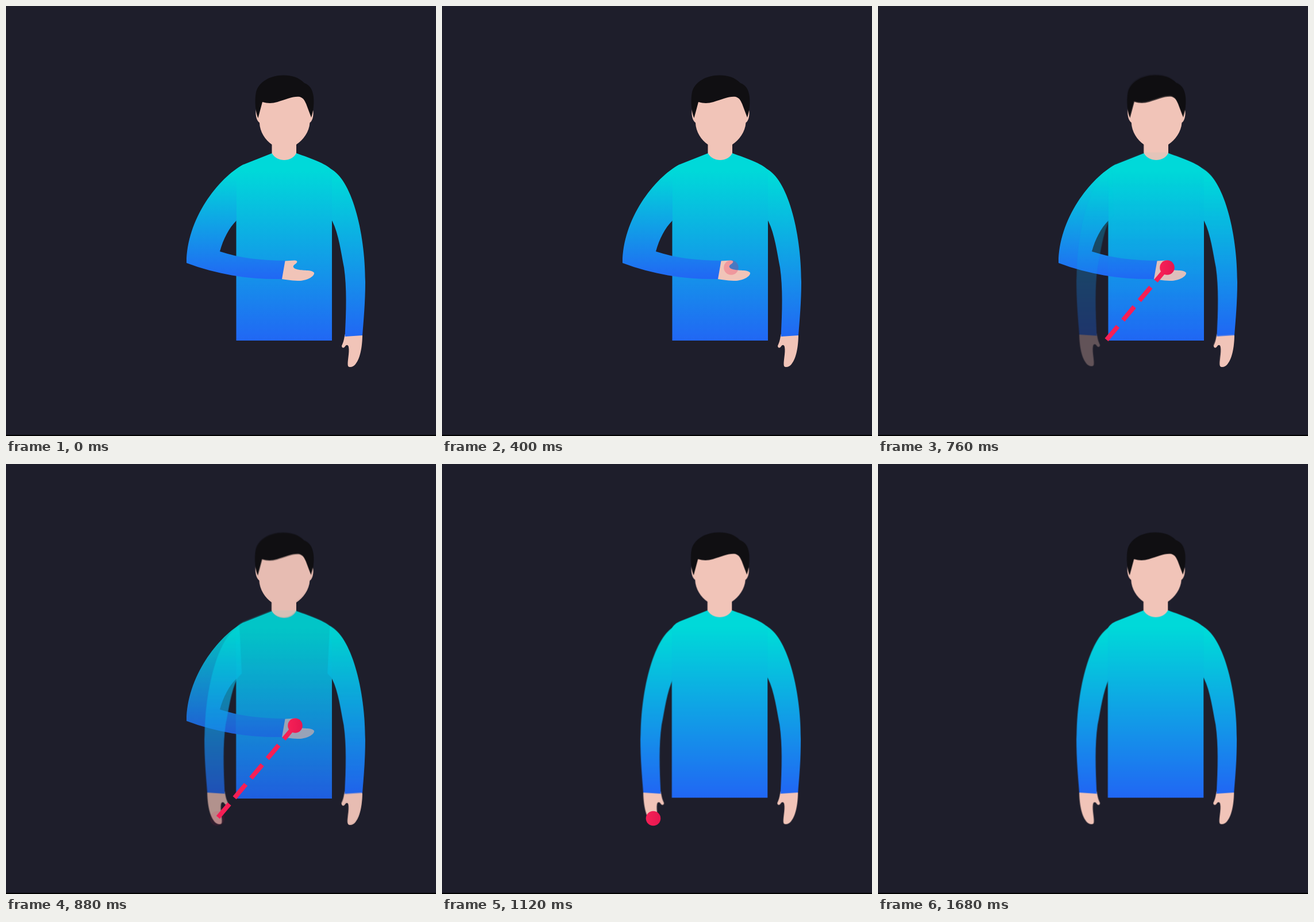
These frames come from a looping animation (748x748 px, 2680 ms). An HTML page:

```html
<!DOCTYPE html>
<html lang="en">
<head>
<meta charset="utf-8">
<title>Arm swing</title>
<style>
  html, body { margin: 0; width: 100%; height: 100%; overflow: hidden; background: #1e1e2b; }
  svg { display: block; width: 100%; height: 100%; }
  .skin { fill: #f1c4b8; }
  .hair { fill: #100f12; }
  .anim { animation: 2680ms linear infinite; }
  #bent { animation-name: bent; }
  .limbs { animation-name: limbs; }
  .shirt { animation-name: shirt; }
  #from { animation-name: from; }
  #to { animation-name: to; }
  #reveal { stroke-dasharray: 212 600; animation-name: reveal; }

  @keyframes bent {
    0%, 31.34% { opacity: 1; }
    32.84% { opacity: .86; }
    35.82% { opacity: .25; }
    37.31%, 100% { opacity: 0; }
  }
  @keyframes limbs {
    0%, 25.37% { opacity: 0; }
    28.36% { opacity: .32; }
    32.84% { opacity: .7; }
    35.82%, 100% { opacity: 1; }
  }
  /* the shirt follows the limbs a little later */
  @keyframes shirt {
    0%, 26.87% { opacity: 0; }
    28.36% { opacity: .08; }
    32.84% { opacity: .29; }
    35.82%, 100% { opacity: 1; }
  }
  @keyframes from {
    0%, 13.43% { opacity: 0; }
    19.4%, 33.02% { opacity: 1; }
    35.82% { opacity: .2; }
    36.57%, 100% { opacity: 0; }
  }
  @keyframes to {
    0%, 32.46% { opacity: 0; }
    35.82% { opacity: .75; }
    36.94%, 52.24% { opacity: 1; }
    58.21%, 100% { opacity: 0; }
  }
  @keyframes reveal {
    0%, 24.63% { stroke-dashoffset: 212; }
    29.29%, 36.75% { stroke-dashoffset: 0; }
    41.42%, 100% { stroke-dashoffset: -212; }
  }
</style>
</head>
<body>
<svg viewBox="0 0 748 748">
  <defs>
    <linearGradient id="cloth" gradientUnits="userSpaceOnUse" x1="0" y1="286" x2="0" y2="582">
      <stop offset="0" stop-color="#00d9d9"/>
      <stop offset="1" stop-color="#2167f4"/>
    </linearGradient>
    <linearGradient id="sleeve" gradientUnits="userSpaceOnUse" x1="0" y1="298" x2="0" y2="575">
      <stop offset="0" stop-color="#00d9d9"/>
      <stop offset="1" stop-color="#2167f4"/>
    </linearGradient>
    <linearGradient id="fold" gradientUnits="userSpaceOnUse" x1="0" y1="290" x2="0" y2="474">
      <stop offset="0" stop-color="#00d9d9"/>
      <stop offset="1" stop-color="#2167f4"/>
    </linearGradient>
    <linearGradient id="red">
      <stop offset="0" stop-color="#f62056"/>
      <stop offset="1" stop-color="#e61750"/>
    </linearGradient>

    <g id="arm">
      <path class="skin" d="M590 572 L620 571 C620 590 617 612 608 623 C604 628 598 629.500 595 626.500 C593 620 598 603 596 593 C595 589 592 589 590 592 C587 596 584 595 584 591 C587 585 588 580 589.500 571 Z"/>
      <path fill="url(#sleeve)" d="M564 283 C600 300 625 390 625 480 C625 515 622 548 620 573 L589.500 575 C592 530 593 490 588 455 C583 430 579 397 567.500 374 L560 366 Z"/>
    </g>

    <path id="torso" fill="url(#cloth)" d="M463 256 L415 275 C408 278 403 282 400.500 288 V582 H567 V285 C556 274 530 265 505 256 Z"/>

    <g id="head">
      <path class="skin" d="M437 162 L434.500 183 C434 190 436 200 441 203 C441.500 219 451 233 462.500 241 V256 C471 272 497 272 505 256 V241 C517 233 527.500 219 528.500 203 C533 200 535 192 534.500 184 L530 155 Z"/>
      <path class="hair" d="M438.500 195 L446 167 C455 169.500 463 169.500 472 167 C488 162 500 156.500 511 158 C518 160 520 166 522 170 L531 194 C535 182 536 170 535 158 C533 143 527 137 519 134 C509 124 497 120.500 483 120.500 C458 120.500 439 133 435 150 C432 165 434 185 438.500 195 Z"/>
    </g>

    <mask id="wipe" maskUnits="userSpaceOnUse" x="0" y="0" width="748" height="748">
      <path id="reveal" class="anim" d="M503 455 L367 617" fill="none" stroke="#fff" stroke-width="14"/>
    </mask>
  </defs>

  <rect width="748" height="748" fill="#1e1e2b"/>
  <rect y="746" width="748" height="2" fill="#000"/>

  <g id="bent" class="anim">
    <use href="#arm"/>
    <use href="#torso"/>
    <use href="#head"/>
    <path fill="url(#fold)" d="M414 275 C369 299 314 371 314 447 C370 468 425 476 481 475 L487 443 C445 443 405 438 372 427 C378 405 388 386 401 373 V290 Z"/>
    <path class="skin" d="M485.500 443.500 L502 442.500 C508 443 507.500 446 503 449 C498 452 498.500 456 506 458 C515 461 532 458 536 464 C537 470 525 477 512 478 C500 478 488 476.500 480 475 Z"/>
  </g>

  <g transform="translate(-.7 -1.500)">
    <g class="anim limbs">
      <use href="#arm"/>
      <use href="#arm" transform="translate(970.800 0) scale(-1 1)"/>
    </g>
    <use href="#torso" class="anim shirt"/>
    <use href="#head" class="anim limbs"/>
  </g>

  <g mask="url(#wipe)">
    <path d="M503 455 L367 617" fill="none" stroke="#f71f55" stroke-width="8" stroke-dasharray="30.500 14"/>
  </g>
  <circle id="from" class="anim" cx="503" cy="455" r="12.800" fill="url(#red)"/>
  <circle id="to" class="anim" cx="367.500" cy="616.500" r="12.800" fill="url(#red)"/>
</svg>
</body>
</html>
```
